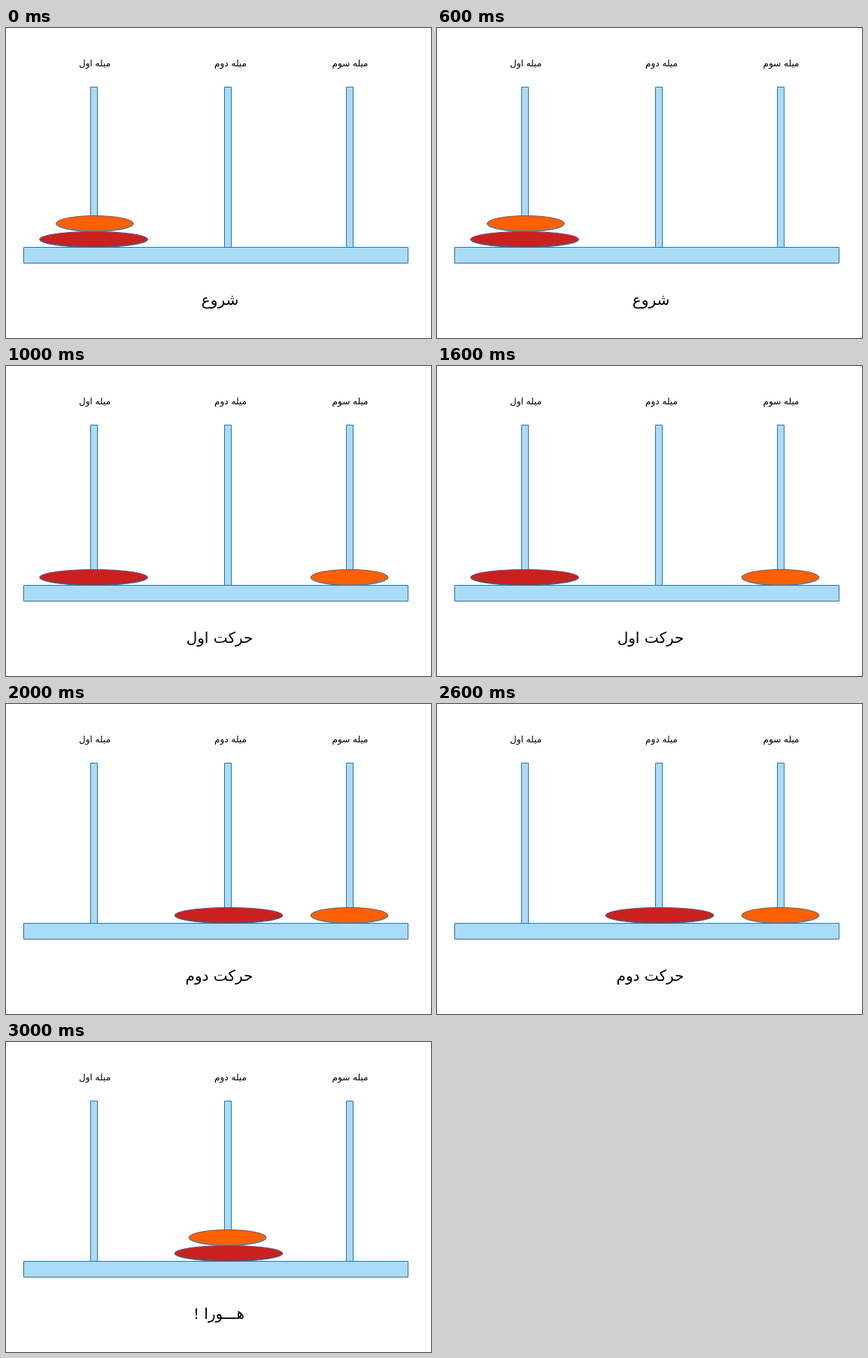
Write an HTML page with a canvas that moves like this. It is 565 px wide and 412 px high and loops after 4 s.

```html
<!DOCTYPE html>
<html lang="fa">
<head>
<meta charset="utf-8">
<style>
  html, body { margin: 0; width: 100%; height: 100%; overflow: hidden; background: #fff; }
  canvas { display: block; }
</style>
</head>
<body>
<canvas id="stage" width="565" height="412"></canvas>
<script>
const ctx = document.getElementById('stage').getContext('2d');
const STEP = 1000;
const BLUE = '#aadcf7', EDGE = '#3070ab', RED = '#c9211e', ORANGE = '#ff6000';
const FONT = '"DejaVu Sans", "Noto Sans", sans-serif';

const rods = [
  { x: 117, label: 'میله اول', labelX: 118 },
  { x: 295, label: 'میله دوم', labelX: 298.5 },
  { x: 457, label: 'میله سوم', labelX: 457.5 }
];

// Disk positions are [x, level], with level 0 resting on the base.
const steps = [
  { red: [116, 0], orange: [117.5, 1], title: 'شروع', x: 284.5 },
  { red: [116, 0], orange: [456, 0], title: 'حرکت اول', x: 284 },
  { red: [295.5, 0], orange: [456, 0], title: 'حرکت دوم', x: 283.5 },
  { red: [295.5, 0], orange: [294, 1], title: 'هـــورا !', x: 283 }
];

function paint(color) {
  ctx.fillStyle = color;
  ctx.fill();
  ctx.strokeStyle = EDGE;
  ctx.stroke();
}

function box(x, y, w, h) {
  ctx.beginPath();
  ctx.rect(x + 0.5, y + 0.5, w, h);
  paint(BLUE);
}

function disk([x, level], rx, color) {
  ctx.beginPath();
  ctx.ellipse(x + 0.5, 281 - level * 21, rx, 10.5, 0, 0, Math.PI * 2);
  paint(color);
}

function text(str, x, y, size) {
  ctx.font = `${size}px ${FONT}`;
  ctx.fillStyle = '#000';
  ctx.fillText(str, x, y);
}

function draw(now) {
  const step = steps[Math.floor(now / STEP) % steps.length];
  ctx.fillStyle = '#fff';
  ctx.fillRect(0, 0, 565, 412);
  ctx.lineWidth = 1;
  ctx.direction = 'rtl';
  ctx.textAlign = 'center';

  for (const rod of rods) {
    box(rod.x - 5, 78, 9, 213);
    text(rod.label, rod.labelX, 51, 12);
  }
  box(23, 291, 511, 21);
  disk(step.red, 72, RED);
  disk(step.orange, 51.5, ORANGE);
  text(step.title, step.x, 368, 20);
}

function tick() {
  draw(performance.now());
  requestAnimationFrame(tick);
}
tick();
</script>
</body>
</html>
```
